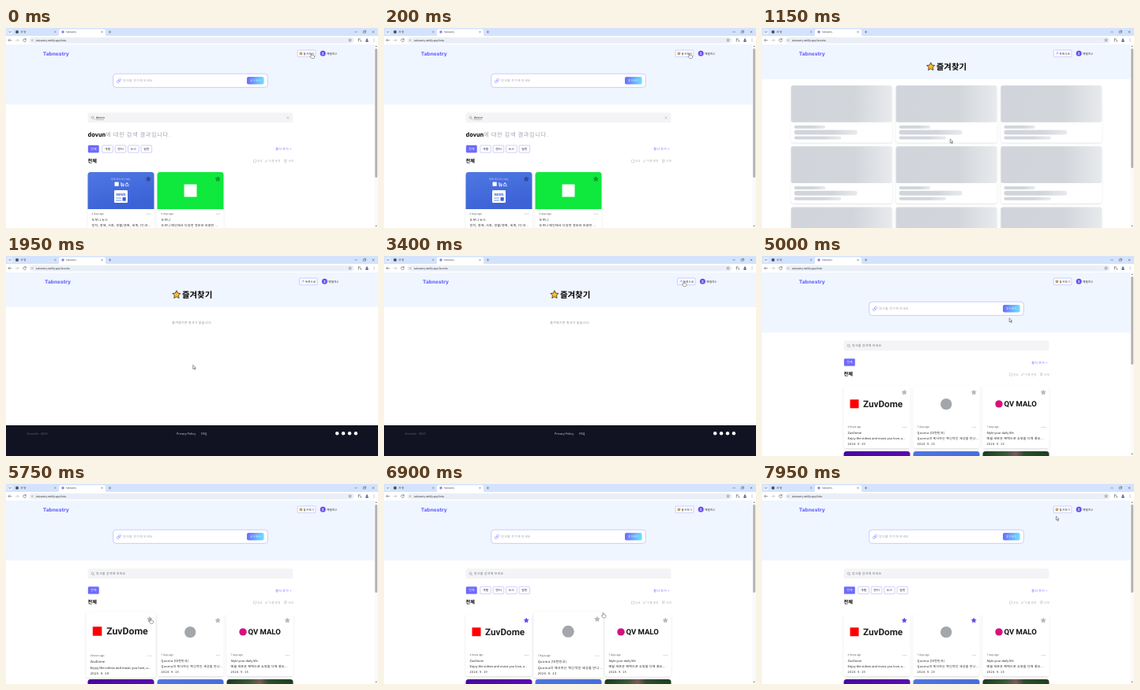
Recreate the animation shown at these times as an HTML page. Size 471 by 254 pixels, loop 8000 ms.

```html
<!DOCTYPE html>
<html>
<head>
<meta charset="utf-8">
<title>Bookmarks</title>
<style>
html, body { margin: 0; width: 100%; height: 100%; overflow: hidden; background: #fff; }
svg { display: block; width: 100%; height: 100%; }
text {
  font-family: "Noto Sans CJK KR", "Noto Sans CJK JP", "Noto Sans CJK", sans-serif;
  text-rendering: geometricPrecision;
  white-space: pre;
}
.ui { font-family: Roboto, "Noto Sans CJK KR", "Noto Sans CJK", sans-serif; }
.logo { font-family: Inter, sans-serif; }
.wide { letter-spacing: .08em; }
</style>
</head>
<body>
<svg id="stage" viewBox="0 0 471 254" preserveAspectRatio="none"></svg>
<script>
const LOOP = 8000;
const PURPLE = '#6d6afe', INK = '#222', GREY = '#9fa6b2';
const BODY = 3.9, HAIR = 0.32;
const CARD_W = 84, CARD_H = 79.7, CARD_X = [103.5, 191.5, 279.5], CARD_Y = 164.4;
const stage = document.getElementById('stage');
const $ = id => document.getElementById(id);

// Markup helpers
const rect = (x, y, w, h, fill, r = 0, more = '') =>
  `<rect x="${x}" y="${y}" width="${w}" height="${h}" rx="${r}" fill="${fill}" ${more}/>`;
const disc = (x, y, r, fill) => `<circle cx="${x}" cy="${y}" r="${r}" fill="${fill}"/>`;
const latin = (x, y, s, size, fill = INK, more = '') =>
  `<text x="${x}" y="${y}" font-size="${size}" fill="${fill}" ${more}>${s}</text>`;
const korean = (x, y, s, size = BODY, fill = INK, more = '') =>
  latin(x, y, s, size, fill, `class="wide" ${more}`);
const text = (x, y, s, ...rest) => (/[가-힣]/.test(s) ? korean : latin)(x, y, s, ...rest);
const line = (d, color = '#444', w = 0.5) =>
  `<path d="${d}" fill="none" stroke="${color}" stroke-width="${w}" stroke-linecap="round"/>`;
const group = (id, body) => `<g id="${id}">${body}</g>`;
const border = (color = PURPLE, w = HAIR) => `stroke="${color}" stroke-width="${w}"`;
const MID = 'text-anchor="middle"', BOLD = 'font-weight="700"';
const cross = (x, y, r, color, w) =>
  line(`M${x - r} ${y - r}l${2 * r} ${2 * r}M${x + r} ${y - r}l${-2 * r} ${2 * r}`, color, w);

function star(x, y, r, fill, more = '') {
  let pts = '';
  for (let i = 0; i < 10; i++) {
    const a = i * Math.PI / 5, k = i % 2 ? r * 0.48 : r;
    pts += `${(x + k * Math.sin(a)).toFixed(2)},${(y - k * Math.cos(a)).toFixed(2)} `;
  }
  return `<polygon points="${pts}" fill="${fill}" stroke-linejoin="round" ${more}/>`;
}

function fade(id, stops, dir = 'x2="1" y2="0"') {
  const parts = stops.map(([at, c]) => `<stop offset="${at}" stop-color="${c}"/>`).join('');
  return `<linearGradient id="${id}" ${dir}>${parts}</linearGradient>`;
}

const defs = `<defs>
  ${fade('add', [[0, PURPLE], [1, '#6ae3fe']])}
  ${fade('bone', [[0, '#d1d5db'], [0.62, '#d2d6db'], [1, '#e8eaed']])}
  ${fade('blue', [[0, '#4f78e3'], [1, '#3c62d6']], 'x2="0.4" y2="1"')}
  ${fade('violet', [[0, '#4508a0'], [1, '#5a0cb0']])}
  ${fade('leaf', [[0, '#1b3a20'], [0.35, '#3a5a38'], [0.5, '#7a5a5c'], [0.62, '#2c4c2c'], [1, '#1c4020']])}
  <filter id="soft" x="-10%" y="-10%" width="120%" height="125%">
    <feDropShadow dx="0" dy="1" stdDeviation="1.3" flood-color="#000" flood-opacity=".14"/>
  </filter>
</defs>`;

function browserBar() {
  return rect(0, 0, 471, 10.5, '#d3e3fd') + rect(0, 10, 471, 10.8, '#fff') +
    rect(1.5, 1.5, 7, 7, '#e4eefe', 2) + line('M3.8 4.5l1.2 1.2l1.2-1.2', '#333', 0.6) +
    disc(14, 5, 2, '#4a4f57') + text(18.3, 6.3, '새 탭', 3.1, '#333') +
    cross(62.3, 5, 0.8, '#444', 0.4) +
    `<path d="M65 10.5q2 0 2-2v-5q0-2 2-2h55q2 0 2 2v5q0 2 2 2z" fill="#fff"/>` +
    disc(72, 5, 1.7, '#8b7cf0') + text(76, 6.1, 'Tabnestry', 2.95, '#333', 'class="ui"') +
    cross(121.5, 5, 0.8, '#333', 0.4) + line('M130 5h3M131.5 3.5v3', '#333', 0.4) +
    line('M441.5 5h3M452.6 4h2.3v2.3h-2.3zM453.3 3.3h2.3v2.3', '#333', 0.4) +
    cross(465, 5, 1.1, '#333', 0.4) +
    line('M7 15.5h-4m1.7-1.7l-1.7 1.7l1.7 1.7', '#444', 0.5) +
    line('M12 15.5h4m-1.7-1.7l1.7 1.7l-1.7 1.7', '#aaa', 0.5) +
    line('M25 14.3a1.9 1.9 0 1 0 .4 1.5M25.2 13.2v1.4h-1.4', '#444', 0.5) +
    rect(29.5, 11.8, 411, 7.6, '#eaeff7', 3.8) +
    disc(33.2, 15.6, 2.6, '#fff') + line('M31.8 14.8h2.8M31.8 16.4h2.8', '#444', 0.4) +
    `<text id="url" class="ui" x="38" y="16.8" font-size="3.35" fill="#333"></text>` +
    star(435.6, 15.5, 1.9, 'none', border('#444', 0.4)) +
    line('M446.3 14h2.4M446.3 17v-3M448.5 16h1.2v1.2', '#444', 0.6) +
    disc(457, 14.5, 1, '#2d4a8a') + rect(455.2, 15.7, 3.6, 1.8, '#2d4a8a', 0.8) +
    [13.9, 15.5, 17.1].map(y => disc(466, y, 0.4, '#333')).join('');
}

function header() {
  const label = (id, s, icon) => group(id, icon + text(376.6, 33.7, s, 3.4));
  return latin(46.8, 34.5, 'Tabnestry', 6.5, PURPLE, 'class="logo" font-weight="800"') +
    rect(369.2, 28.1, 22.7, 8.6, '#fff', 1.1, border()) +
    label('toFav', '즐겨찾기', star(373.4, 32.5, 2, '#fbbc2c', border('#5a4210', 0.4))) +
    label('toList', '목록으로', line('M372.2 33.8l2.6-2.6m-1.8 0h1.8v1.8', PURPLE, 0.45)) +
    disc(401.2, 32.2, 3.5, '#6b50e8') + disc(401.2, 31.5, 0.8, '#e6e0ff') +
    rect(400.1, 32.6, 2.2, 1.2, '#e6e0ff', 0.6) +
    text(405.9, 33.7, '체험자2', 3.6);
}

function chip(x, y, s, on) {
  return rect(x, y, 13.6, 9.2, on ? PURPLE : '#fff', 1.2, border()) +
    text(x + 6.95, y + 6, s, 3.8, on ? '#fff' : INK, MID);
}

const folders = y => ['개발', '엔터', '뉴스', '일반']
  .map((s, i) => chip(121.8 + i * 16.4, y, s)).join('');

// Row of folder chips, heading and actions; y is the top of the chips
function toolbar(y) {
  const act = y + 21.3;
  return chip(104, y, '전체', true) + text(341.3, y + 6.1, '폴더 추가 +', BODY, PURPLE) +
    latin(103.5, y + 21.7, '전체', 6.2, '#000', BOLD) +
    line(`M316.5 ${act - 1}v1.5h-3v-3.2h1.6m1 0h.9v.9`, GREY, 0.4) + text(318, act, '공유', 3.4, GREY) +
    line(`M329 ${act}l3-3m-3 1.3v1.7`, GREY, 0.45) + text(333, act, '이름 변경', 3.4, GREY) +
    line(`M352.3 ${act - 2.7}h3M352.8 ${act - 2.2}v2.4h2v-2.4`, GREY, 0.45) + text(357, act, '삭제', 3.4, GREY);
}

function card(id, x, y, o) {
  return group(id,
    rect(x, y, CARD_W, CARD_H, '#fff', 3.5, 'filter="url(#soft)"') +
    (o.bg ? `<path d="M${x} ${y + 47}v-43.5q0-3.5 3.5-3.5h77q3.5 0 3.5 3.5v43.5z" fill="${o.bg}"/>` : '') +
    o.art(x, y) +
    star(x + 76.7, y + 8.9, 3.3, o.bg ? 'rgba(0,0,0,.3)' : '#b9b9bb',
      `id="${id}Star" ${border(o.bg ? 'rgba(20,30,60,.55)' : '#a5a5a8', 0.4)}`) +
    text(x + 5, y + 53.9, o.ago, 3.15, '#555') +
    [74.7, 76.7, 78.7].map(d => disc(x + d, y + 53, 0.4, '#555')).join('') +
    text(x + 5, y + 61.8, o.name, BODY) +
    text(x + 5, y + 68.7, o.about, BODY) +
    korean(x + 5, y + 75.4, o.date));
}

const video = {
  name: 'ZuvDome', about: 'Enjoy the videos and music you love, u...', ago: '4 hours ago', date: '2024. 9. 19',
  art: (x, y) => rect(x + 8, y + 17.9, 11, 11, '#f00') +
    latin(x + 24.5, y + 27.6, 'ZuvDome', 11.7, '#222', `class="ui" ${BOLD}`)
};
const device = {
  name: 'Quoma (대한민국)', about: 'Quoma의 제시하는 혁신적인 세상을 만나...', ago: '7 days ago', date: '2024. 9. 13',
  art: (x, y) => disc(x + 41.7, y + 23.7, 7.2, '#a3a7ab')
};
const shop = {
  name: 'Style your daily life', about: '매월 새로운 혜택으로 쇼핑을 다채 풍요...', ago: '7 days ago', date: '2024. 9. 13',
  art: (x, y) => disc(x + 20.5, y + 23.5, 4.7, '#d6127c') +
    latin(x + 27, y + 27, 'QV MALO', 9.5, '#111', `class="ui" ${BOLD}`)
};
const news = {
  name: '도부니 뉴스', about: '정치, 경제, 사회, 생활/문화, 세계, IT/과...', ago: '6 days ago', date: '2024. 9. 12', bg: 'url(#blue)',
  art: (x, y) => text(x + 42, y + 10.2, '언제 어디서나 보는', 2.9, '#e8eeff', MID) +
    rect(x + 34, y + 12.6, 5.2, 5.2, '#fff') + latin(x + 41, y + 17.7, '뉴스', 6.3, '#fff', BOLD) +
    rect(x + 33.5, y + 23, 17, 16, '#fff', 1.2) +
    latin(x + 42, y + 30, 'NEWS', 4.4, '#3b62d8', `class="ui" ${BOLD} ${MID}`) +
    line(`M${x + 36} ${y + 33}h6M${x + 36} ${y + 36}h6`, '#3b62d8', 0.7) + rect(x + 44, y + 32, 4.2, 4.6, '#3b62d8')
};
const portal = {
  name: '도부니', about: '도부니 메인에서 다양한 정보와 유용한 ...', ago: '6 days ago', date: '2024. 9. 12', bg: '#0fe83c',
  art: (x, y) => rect(x + 34, y + 15.5, 16, 16, '#fff')
};

function addLink() {
  const ring = x => rect(x, 65.7, 3.6, 2.6, 'none', 1.3, border(PURPLE, 0.5));
  return rect(0, 20.5, 471, 76.8, '#f0f6ff') +
    rect(135.7, 58.2, 195.6, 17.2, '#fff', 3.6, border()) +
    `<g transform="rotate(-45 143 67)">${ring(139.8)}${ring(142.6)}</g>` +
    text(148.3, 68.2, '링크를 추가해 보세요', BODY, GREY) +
    rect(305, 62, 21.6, 9.4, 'url(#add)', 2) +
    text(315.9, 67.9, '추가하기', 3.4, '#fff', MID) +
    rect(103.5, 107.6, 260, 12.7, '#f4f4f6', 2.5) +
    `<circle cx="109.6" cy="113.7" r="1.5" fill="none" ${border('#666', 0.4)}/>` +
    line('M110.7 114.8l1.1 1.1', '#666', 0.4);
}

function searchPage() {
  return text(113.7, 115.2, 'dovun', 3.8, INK) + line('M113.7 116.4h10', '#e33', 0.4) +
    cross(356.9, 114, 1.2, GREY, 0.5) +
    `<text x="103.5" y="137.6" font-size="7.3" font-weight="500" fill="${GREY}">` +
    `<tspan font-weight="700" fill="#000">dovun</tspan><tspan class="wide">에 대한 검색 결과입니다.</tspan></text>` +
    toolbar(149) + folders(149) +
    card('news', CARD_X[0], 183, news) + card('portal', CARD_X[1], 183, portal);
}

function listPage() {
  const next = ['violet', 'blue', 'leaf'].map((g, i) => rect(CARD_X[i], 247.9, CARD_W, 20, `url(#${g})`, 3.5));
  return text(114, 115.2, '링크를 검색해 보세요', BODY, '#70757f') +
    toolbar(130.4) + group('folders', folders(130.4)) + next.join('') +
    [video, device, shop].map((o, i) => card('card' + i, CARD_X[i], CARD_Y, o)).join('');
}

function favTop() {
  return star(213.7, 49.2, 5.4, '#fdbb2d', border('#333', 0.8)) +
    latin(220.8, 52.9, '즐겨찾기', 10.4, '#000', BOLD);
}

function skeleton() {
  let s = '';
  for (let i = 0; i < 9; i++) {
    const x = 36.8 + (i % 3) * 132.8, y = 73 + Math.floor(i / 3) * 77.2;
    const bone = (dy, w, h) => rect(x + 4, y + dy, w, h, 'url(#bone)', h / 2);
    s += rect(x, y, 127.8, 72.3, '#fff', 3, 'filter="url(#soft)"') + rect(x, y, 127.8, 46.7, 'url(#bone)', 2.5) +
      bone(50.7, 39.5, 4) + bone(56.6, 80, 5.9) + bone(64.6, 59.5, 4);
  }
  return s;
}

function emptyPage() {
  return text(235.6, 86.3, '즐겨찾기한 링크가 없습니다.', BODY, '#888', MID) +
    rect(0, 215, 471, 39, '#111322') +
    text(26, 226.7, '©orvelo - 2023', BODY, '#676767') +
    text(216, 226.7, 'Privacy Policy', 3.75, '#cfcfcf') + text(247.3, 226.7, 'FAQ', 3.9, '#cfcfcf') +
    [419.2, 427.1, 435, 442.9].map(x => disc(x, 225.2, 2.2, '#fff')).join('');
}

function scrollbar() {
  return rect(466.4, 20.5, 4.6, 234, '#fafafa') +
    `<path d="M467.5 24l1.2-1.6l1.2 1.6zM467.5 250.8l1.2 1.6l1.2-1.6z" fill="#777"/>` +
    `<rect id="thumb" x="467.2" y="26" width="3" rx="1.5" fill="#b4b4b6"/>`;
}

const arrow = `<path d="M0 0v5l1.2-1.1l.9 2l.9-.4l-.9-1.9h1.6z" fill="#fff" ${border('#000', 0.4)}/>`;
const hand = `<path d="M-.6 .6q.6-1 1.2 0v2q2-.2 2.9.7v1.7l-.8 1.6h-2.9l-2-2.7q.3-.9 1.6.1z" fill="#fff" ${border('#000', 0.35)}/>`;

stage.innerHTML = defs + rect(0, 0, 471, 254, '#fff') +
  group('links', addLink() + group('search', searchPage()) + group('list', listPage())) +
  group('fav', rect(0, 20.5, 471, 44.6, '#f0f6ff') + group('favTop', favTop()) +
    group('bones', skeleton()) + group('empty', emptyPage())) +
  group('header', header()) + group('scroll', scrollbar()) + browserBar() +
  group('pointer', group('arrow', arrow) + group('hand', hand));

// Pointer stops: time, x, y
const PATH = [
  [0, 387, 32], [500, 387, 32], [1100, 238.2, 141], [1600, 238.2, 141], [1950, 236.7, 138.5],
  [2600, 262, 85], [3350, 379.5, 32], [4650, 379.5, 32], [5550, 183, 170.7], [6350, 183, 170.7],
  [6900, 277.5, 163.3], [7080, 269, 171.5], [7480, 269, 171.5], [7920, 372.4, 41], [8000, 372.4, 41]
];
const ease = p => p * p * (3 - 2 * p);

function pointerAt(t) {
  const i = Math.max(1, PATH.findIndex(p => p[0] >= t));
  const [t0, x0, y0] = PATH[i - 1], [t1, x1, y1] = PATH[i];
  const k = ease(Math.max(0, (t - t0) / (t1 - t0)));
  return [x0 + (x1 - x0) * k, y0 + (y1 - y0) * k];
}

const within = ([px, py], x, y, w, h) => px >= x && px <= x + w && py >= y && py <= y + h;
const overCard = (t, i) => within(pointerAt(t), CARD_X[i] - 2.1, CARD_Y - 2.2, CARD_W + 4.2, CARD_H + 4.4);

// Hover amount, smoothed over the last 200 ms
function hover(t, i) {
  let sum = 0;
  for (let d = 0; d < 200; d += 20) sum += overCard(t - d, i);
  return ease(sum / 10);
}

const show = (id, on) => $(id).setAttribute('display', on ? 'inline' : 'none');
const move = (id, x, y) => $(id).setAttribute('transform', `translate(${x} ${y})`);

function draw(t) {
  const page = t < 300 ? 'search' : t < 1850 ? 'bones' : t < 4300 ? 'empty' : 'list';
  const fav = page === 'bones' || page === 'empty';
  ['search', 'bones', 'empty', 'list'].forEach(id => show(id, id === page));
  show('links', !fav);
  show('fav', fav);
  show('toFav', !fav);
  show('toList', fav);
  show('scroll', page !== 'empty');
  $('thumb').setAttribute('height', { search: 164, bones: 152, empty: 0, list: 112 }[page]);
  $('url').textContent = 'tabnestry.netlify.app/' + (fav ? 'favorite' : 'links');
  const shift = page === 'empty' ? 2.2 : 0;
  move('header', shift, 0);
  move('favTop', shift, 0);

  show('folders', t >= 6300);
  [6050, 7300].forEach((at, i) => {
    const s = $(`card${i}Star`);
    s.setAttribute('fill', t >= at ? '#5d44f0' : '#b9b9bb');
    s.setAttribute('stroke', t >= at ? '#5d44f0' : '#a5a5a8');
  });
  CARD_X.forEach((x, i) => {
    const k = page === 'list' ? 1 + 0.05 * hover(t, i) : 1;
    const cx = x + CARD_W / 2, cy = CARD_Y + CARD_H / 2;
    $('card' + i).setAttribute('transform', `translate(${cx} ${cy}) scale(${k}) translate(${-cx} ${-cy})`);
  });

  const p = pointerAt(t);
  const link = within(p, 369 + shift, 28, 23, 9) ||
    (page === 'list' && CARD_X.some((_, i) => overCard(t, i)));
  move('pointer', p[0], p[1]);
  show('hand', link);
  show('arrow', !link);
}

const begin = performance.now();
function tick() {
  draw((performance.now() - begin) % LOOP);
  requestAnimationFrame(tick);
}
tick();
</script>
</body>
</html>
```
